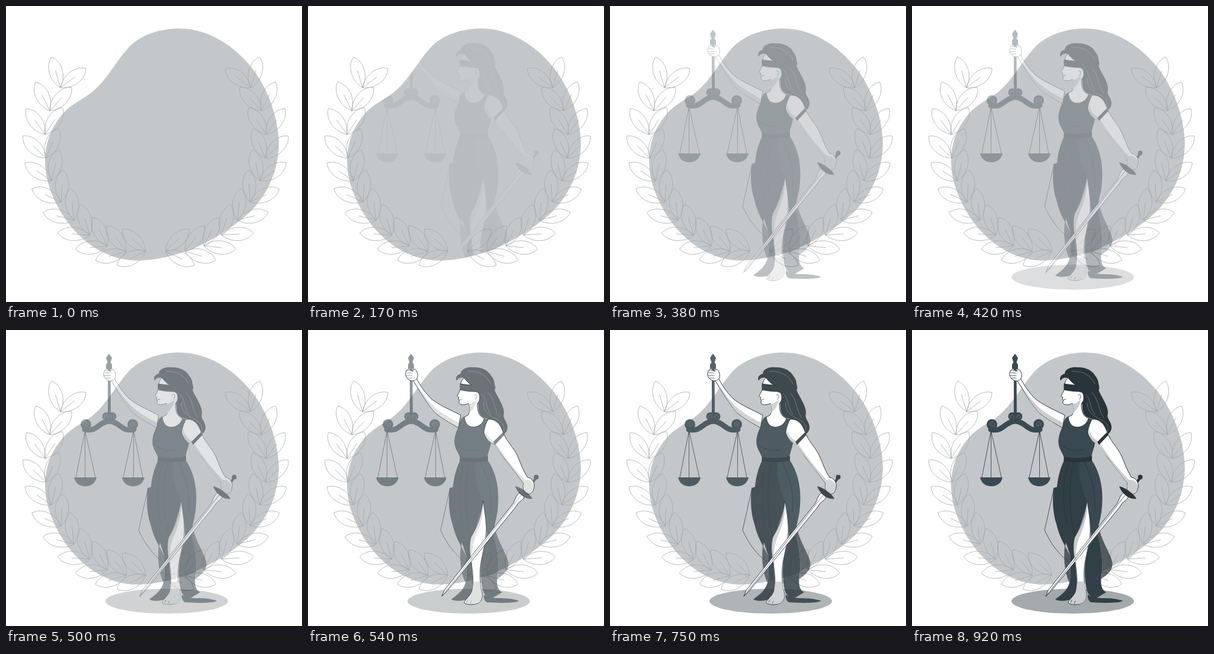
An HTML page for the animation above (1000 ms loop, 500 by 500 pixels).

```html
<!DOCTYPE html>
<html lang="en">
<head>
<meta charset="utf-8">
<title>Lady Justice</title>
<style>
html, body { margin: 0; width: 100%; height: 100%; overflow: hidden; background: #fff; }
svg { display: block; width: 100%; height: 100%; }
path { stroke-linejoin: round; stroke-linecap: round; }
.leaf { fill: none; stroke: #a5a9ab; stroke-width: .8; }
.ink { fill: #263238; }
.mid { fill: #37474f; }
.deep { fill: #2f3d44; }
.line { fill: none; stroke: #263238; stroke-width: .8; }
.beam { fill: none; stroke: #37474f; stroke-width: 9; }
.shine { fill: none; stroke: #8b969b; stroke-width: .6; }
.skin { fill: #fff; stroke: #263238; stroke-width: .8; }
.shade { fill: #c9cccd; }
.veil { fill: #263238; fill-opacity: .74; }
#glow .skin { stroke: none; }
</style>
</head>
<body>
<svg viewBox="0 0 500 500">
  <defs>
    <path id="blob" d="M290 38C345 37 395 73 425 118C448 154 460 195 461 232C460 285 437 330 396 362C345 402 285 429 222 430C165 430 119 392 93 349C73 314 66 288 66 260C67 230 76 205 96 182C110 165 132 157 147 144C172 123 186 92 210 67C232 47 260 39 290 38Z"/>
    <clipPath id="inside"><use href="#blob"/></clipPath>

    <g id="body">
      <!-- raised arm and hand -->
      <path class="skin" d="M183 81C190 95 198 106 208 116C221 127 239 134 258 144L254 165C240 157 224 148 214 139C201 124 190 105 178 86Z"/>
      <path class="skin" d="M167 68C170 66 174 69 177 70C177 66 181 65 183 69C186 74 186 80 183 83C179 88 172 86 168 82C164 78 164 72 167 68Z"/>
      <!-- face, neck and chest -->
      <path class="skin" d="M258 91C259 87 260 83 264 81C267 86 271 89 276 93Z"/>
      <path class="skin" d="M257 101C256 105 253 109 252 111C252 113 255 113 255 114L254 117L256 119C254 122 255 125 259 126C264 127 268 125 271 124C274 131 274 139 270 144L264 147C265 157 270 164 279 164C289 164 296 157 298 149C289 146 286 138 286 124C291 120 291 112 288 106L283 104C274 104 265 103 257 101Z"/>
      <!-- lowered arm -->
      <path class="skin" d="M304 151C316 149 325 159 329 171C334 187 347 198 354 213C360 227 364 239 371 249C378 250 383 257 382 265C381 273 377 278 370 277C365 275 362 268 364 259C353 244 343 231 331 216L315 193C304 189 298 180 297 172C298 164 301 157 304 151Z"/>
      <!-- leg and foot -->
      <path class="skin" d="M296 289C298 305 302 325 301 342C300 362 293 382 291 402C290 419 291 432 294 444C296 452 292 460 286 462C279 465 268 464 264 461C263 457 272 452 276 443C281 431 278 410 276 393C273 378 272 363 275 351C282 338 288 327 291 314Z"/>
      <!-- blade -->
      <path class="skin" d="M357 275L365 281C365 287 357 289 354 294L350 300L234 442L226 450L230 440L345 295C350 290 349 282 357 275Z"/>
    </g>

    <g id="arm">
      <path class="line" d="M133.500 170L118 249M133.500 170V249M133.500 170L151 249"/>
      <path class="mid" d="M115 249H153C151 259 143 264 134 264C125 264 117 259 115 249Z"/>
      <path class="beam" d="M133 168C154 173 156 155 174.500 154"/>
      <circle class="mid" cx="135" cy="159.500" r="9"/>
      <circle class="mid" cx="169.500" cy="146" r="7"/>
      <path class="shine" d="M131 161C130 155 138 154 139 159C139 163 134 163 134 160M166 149C165 142 173 142 172 148"/>
    </g>
  </defs>

  <use href="#blob" fill="#c4c7ca"/>
  <path id="left" class="leaf"/>
  <use href="#left" transform="matrix(-1 0 0 1 505.5 0)"/>

  <ellipse id="shadow" cx="271.500" cy="458" rx="103.500" ry="21" fill="#263238"/>
  <use id="glow" href="#body"/>

  <g id="figure">
    <!-- scales -->
    <path class="mid" d="M174 40L179 47L176.500 55L179 58V66H176.500L177 142H172V66H169V58L171.500 55L169 47Z"/>
    <use href="#arm"/>
    <use href="#arm" transform="matrix(-1 0 0 1 349 0)"/>

    <!-- hair -->
    <path class="ink" d="M251 86C248 79 253 75 258 74C258 66 269 62 278 63C292 62 304 67 310 78C315 84 316 91 315 101C319 112 332 128 331 141C328 150 337 154 337 164C337 172 332 177 324 178C329 171 327 164 321 157C313 150 300 151 294 146C285 139 290 127 286 121C290 115 286 108 283 104L262 94L264 82C260 79 253 81 251 86Z"/>
    <path class="shine" d="M270 70C289 68 304 79 309 91M293 108C303 117 300 132 309 143M304 106C317 118 313 134 324 148M297 122C294 133 303 144 317 150C328 155 334 163 330 172"/>

    <!-- robe -->
    <path class="line" d="M240 267L224 338C234 361 248 379 265 392"/>
    <path class="deep" d="M245 265L239 267C237 290 238 310 244 328C247 341 252 354 259 366L264 330Z"/>
    <path class="veil" d="M258 364C256 385 257 408 266 427C271 410 264 390 270 386Z"/>
    <path class="veil" d="M315 328C318 354 334 374 338 391C341 404 330 414 320 420C324 392 319 365 312 338Z"/>
    <path class="deep" d="M269 380C264 390 271 410 266 427C262 441 251 448 242 455C250 459 262 458 271 454C278 446 281 435 278 420L275 385Z"/>
    <path class="deep" d="M302 350L293 389C291 414 292 433 297 444C301 451 307 454 313 452L328 443C320 439 318 429 320 417C324 392 319 365 312 338Z"/>
    <path class="deep" d="M297 447C309 456 331 451 347 455C352 456 357 457 356 458C345 462 319 461 302 460C298 457 296 452 297 447Z"/>
    <path class="deep" d="M257 220C248 239 243 261 245 286C247 318 258 354 269 386L275 390C275 374 271 364 276 349C285 333 290 315 296 289L284 220Z"/>
    <path class="mid" d="M283 220C280 247 287 271 296 289C298 310 304 334 302 361C309 352 316 332 320 307C324 278 321 245 303 219Z"/>
    <path class="mid" d="M264 146C258 148 256 155 254 164C248 176 246 187 248 195C250 204 256 210 257 217H303C304 205 309 197 309 190C304 188 298 181 297 172C298 164 302 157 305 151L298 149C296 157 289 164 279 164C270 164 265 157 264 146Z"/>
    <path class="ink" d="M257 214C271 217 288 217 304 213V221C288 224 271 224 256 221Z"/>
    <path class="line" d="M265 223C254 253 253 292 262 326M273 223C263 263 266 312 275 348M291 223C302 244 312 275 308 307M250 193C261 202 274 206 288 202"/>

    <!-- sword grip -->
    <path d="M385 250L366 276" stroke="#263238" stroke-width="4"/>
    <circle class="ink" cx="385.500" cy="248.500" r="4"/>

    <use href="#body"/>

    <!-- shading and details -->
    <path class="shade" d="M180 88C193 106 204 122 217 133C229 143 243 150 255 157L254 164C240 157 224 148 214 139C201 124 190 105 180 88Z"/>
    <path class="shade" d="M271 125C277 124 282 121 285 117C284 127 279 135 271 141C273 136 273 131 271 125Z"/>
    <path class="shade" d="M299 166C301 177 307 184 316 189C327 207 344 230 366 253C376 252 381 259 381 265C380 273 376 277 370 276C365 275 362 268 364 259L331 216L313 193C304 189 298 180 299 166Z"/>
    <path class="shade" d="M296 291C297 312 290 335 282 352C277 366 276 378 278 396L276 393C273 378 272 363 275 351C282 338 291 325 296 291Z"/>
    <path class="shade" d="M279 425H291L294 444C296 452 292 460 286 462C279 464 268 463 265 460C266 456 274 450 277 442Z"/>
    <path class="line" d="M167 72L176 73M166 77L176 77M168 81L176 81M256 118L260 117M281 110C285 107 287 112 283 117M268 460L270 456M274 462L276 458"/>
    <path class="line" d="M360 279L226 450"/>
    <path class="ink" d="M257 90C274 96 296 96 315 92C317 95 317 99 315 102C296 105 275 105 257 101C256 97 256 93 257 90Z"/>
    <path class="ink" d="M313 189L329 173L332 177L316 194Z"/>
    <path class="ink" d="M350 264C361 266 376 278 379 285C367 287 354 276 350 264Z"/>
  </g>
</svg>
<script>
const $ = id => document.getElementById(id);
const LEAVES = 11, LAST = 22, STEPS = 24;

const bezier = (t, a, b, c, d) => {
  const u = 1 - t;
  return u * u * u * a + 3 * u * u * t * b + 3 * u * t * t * c + t * t * t * d;
};

// Leaf from its base; the angle turns left from straight up
function leaf(x, y, degrees) {
  const a = degrees * Math.PI / 180, sin = Math.sin(a), cos = Math.cos(a);
  const at = (along, side) =>
    `${(x - along * sin + side * cos).toFixed(1)} ${(y - along * cos - side * sin).toFixed(1)} `;
  return `M${at(0, 0)}C${at(16, 15)}${at(42, 15)}${at(54, 0)}` +
    `C${at(42, -15)}${at(16, -15)}${at(0, 0)}L${at(30, 0)}`;
}

// Leaf pairs follow a curved stem, each turned 10 degrees further
let wreath = '';
for (let i = 0; i < LEAVES; i++) {
  const t = i / (LEAVES - 1), turn = i * 10;
  const x = bezier(t, 92, 13, 126, 236), y = bezier(t, 138, 264, 434, 414);
  wreath += leaf(x, y, turn + 16) + leaf(x, y, turn - 53);
}
$('left').setAttribute('d', wreath);

const smooth = t => t * t * (3 - 2 * t);

function draw(now) {
  // 24 steps per second, the last one held
  const step = Math.min(LAST, Math.floor((now % 1000 + 4) * STEPS / 1000));
  const fade = smooth(step / STEPS);
  // faint tones on white stay hidden, bright skin turns pure white halfway
  $('figure').setAttribute('opacity', fade);
  $('figure').setAttribute('clip-path', fade < .15 ? 'url(#inside)' : 'none');
  $('shadow').setAttribute('opacity', fade < .35 ? 0 : fade * .43);
  $('glow').setAttribute('opacity', fade > .5 ? 1 : 0);
}

const start = performance.now();
function tick() {
  draw(performance.now() - start);
  requestAnimationFrame(tick);
}
draw(0);
requestAnimationFrame(tick);
</script>
</body>
</html>
```
